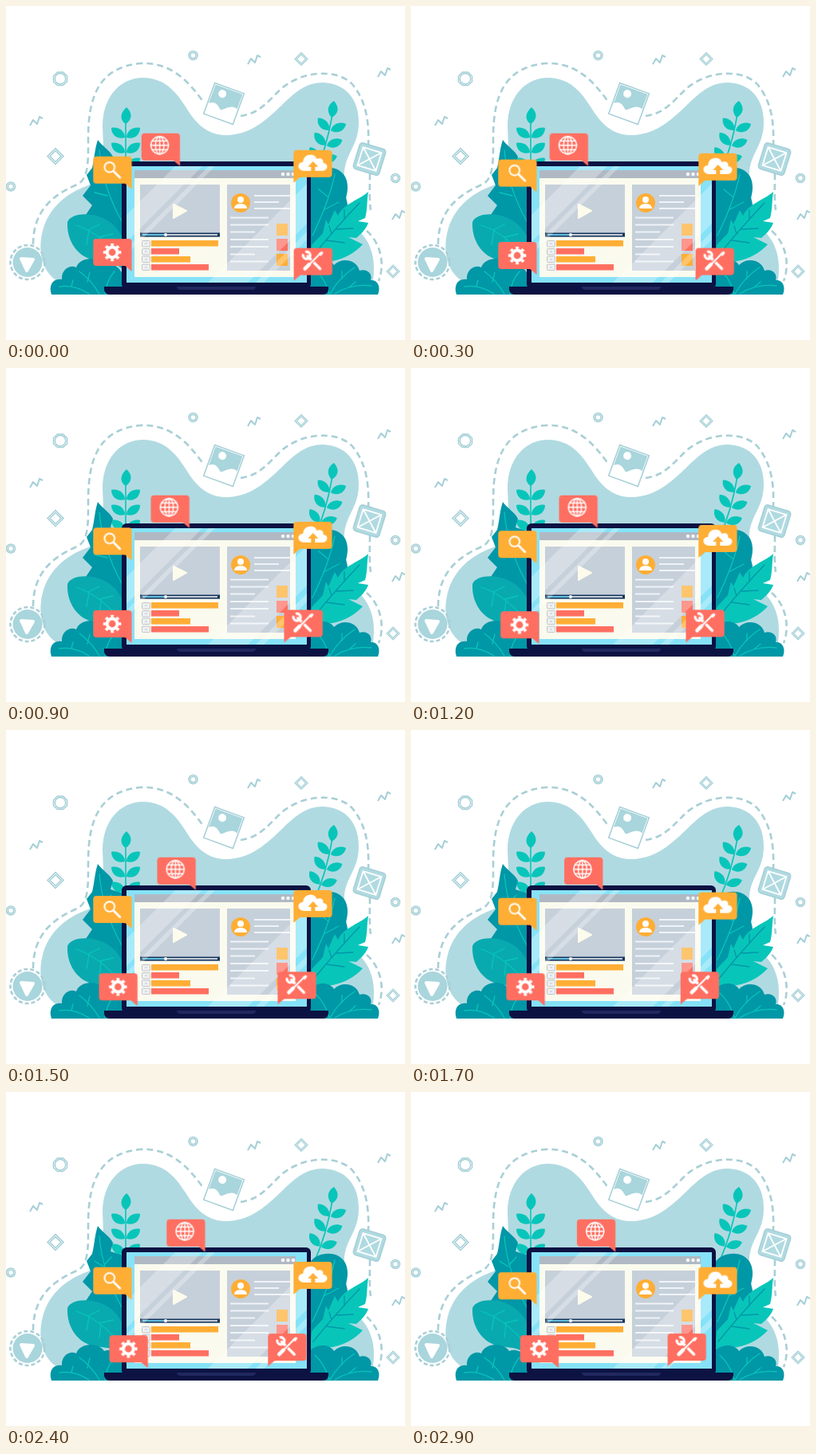
An HTML page for the animation above (3 s loop, 500 px wide and 419 px high).

```html
<!DOCTYPE html>
<html lang="en">
<head>
<meta charset="utf-8">
<title>Laptop with floating bubbles</title>
<style>
html, body { margin: 0; width: 500px; height: 419px; overflow: hidden; background: #fff; }
svg { display: block; }
.line { fill: none; stroke: #a5cfd7; stroke-width: 1.5; }
.dash { fill: none; stroke: #a9cfd6; stroke-width: 2.6; stroke-dasharray: 8 5; }
.vein { fill: none; stroke: #08c5ba; stroke-width: 1.3; stroke-linecap: round; }
.vein.dark { stroke: #0097a7; }
.ink { fill: none; stroke: #fff; stroke-linecap: round; }
.teal { fill: #08c5ba; }
.deep { fill: #0097a7; }
.red { fill: #ff6f61; }
.gold { fill: #ffae35; }
.move { animation: 3s steps(30) infinite; }
.globe { animation-name: globe; }
.search { animation-name: search; }
.cloud { animation-name: cloud; }
.gear { animation-name: gear; }
.tools { animation-name: tools; }
@keyframes globe { from { transform: translate(169.7px, 159.7px); } to { transform: translate(209.2px, 159.7px); } }
@keyframes search { from { transform: translate(109.3px, 188.7px); } to { transform: translate(109.3px, 227.5px); } }
@keyframes cloud { from { transform: translate(360.3px, 180.8px); } to { transform: translate(360.3px, 221px); } }
@keyframes gear {
  0% { transform: translate(109.3px, 292px); animation-timing-function: steps(10); }
  33.3333% { transform: translate(109.3px, 305.2px); animation-timing-function: steps(20); }
  100% { transform: translate(138.2px, 305.2px); }
}
@keyframes tools { from { transform: translate(360.6px, 303.6px); } to { transform: translate(320.2px, 303px); } }
</style>
</head>
<body>
<svg width="500" height="419" viewBox="0 0 500 419">
<defs>
  <path id="bubble" d="M4 0H44.3a4 4 0 0 1 4 4V41L40 34H4a4 4 0 0 1-4-4V4a4 4 0 0 1 4-4Z"/>
  <path id="leaf" d="M1 0C1-8 9-14 18-12C18-3 10 3 1 0Z"/>
  <g id="pair"><use href="#leaf"/><use href="#leaf" transform="scale(-1 1)"/></g>
  <path id="zig" class="line" d="M-8 5L-4-2L1 3L4-6L8-4" stroke-linejoin="round" style="stroke-width:2"/>
  <path id="diamond" class="line" d="M0-10L10 0L0 10L-10 0ZM0-7L7 0L0 7L-7 0Z"/>
  <clipPath id="screen"><path d="M151 201H377V347H151Z"/></clipPath>
</defs>

<!-- backdrop -->
<path fill="#b0dae1" d="M75 350C48 342 38 312 46 282C53 254 75 235 103 225C126 214 122 181 121 151C121 114 143 90 172 90C200 91 213 107 228 131C241 152 257 163 279 162C308 160 326 143 345 125C363 107 377 96 397 96C426 97 442 117 442 146C442 174 427 183 424 207C422 235 432 268 446 286C460 302 464 324 459 350Z"/>
<g class="dash">
  <path d="M34 299C34 262 53 239 89 224C104 217 103 194 103 166C103 108 120 77 168 72C205 70 227 92 247 120"/>
  <path d="M294 138C320 134 329 118 347 102C372 82 412 78 433 97C452 119 455 146 454 174"/>
  <path d="M456 210C456 228 455 242 457 256"/>
  <path d="M452 282C470 298 475 324 467 345"/>
</g>

<!-- scattered outline icons -->
<path class="line" d="M64.5 83H71.5L76.5 88V95L71.5 99.5H64.5L59.5 95V88Z"/>
<circle class="line" cx="68" cy="91.2" r="6.7"/>
<g class="line">
  <circle cx="234.5" cy="62" r="5.5"/><circle cx="234.5" cy="62" r="3.5"/>
  <circle cx="6" cy="226.5" r="5.5"/><circle cx="6" cy="226.5" r="3.5"/>
  <circle cx="488" cy="216" r="5.5"/><circle cx="488" cy="216" r="3.5"/>
</g>
<use href="#zig" x="38" y="145"/><use href="#zig" x="311" y="68"/>
<use href="#zig" x="474" y="84"/><use href="#zig" x="492" y="263"/>
<use href="#diamond" x="62" y="188.5"/>
<use href="#diamond" transform="translate(370 66.5) scale(.8)"/>
<use href="#diamond" transform="translate(485 333) scale(.8)"/>
<g transform="translate(273 122.5) rotate(20)">
  <rect class="line" x="-19.5" y="-20.5" width="39" height="41" style="fill:#fff"/>
  <path fill="#a9d5dc" d="M-18-19H18V1C10-3 5 5-1 9C-7 4-11 0-18 6Z"/>
  <circle cx="-6" cy="-11" r="5" fill="#fff"/>
</g>
<g transform="translate(455.5 192) rotate(17)">
  <rect class="line" x="-17" y="-17" width="34" height="34" rx="4" style="fill:#b0dae1"/>
  <path class="ink" stroke-width="1.8" d="M-12-12H12V12H-12ZL12 12M12-12L-12 12"/>
</g>
<circle class="dash" cx="27" cy="321.5" r="21.5" style="stroke-dasharray:5 3"/>
<circle cx="27" cy="321.5" r="18.5" fill="#a9d5dc"/>
<path fill="#fff" stroke="#fff" stroke-width="4" stroke-linejoin="round" d="M19 317L34 318L26 332Z"/>

<!-- plants -->
<g class="teal">
  <path d="M150 140V210M409 136Q402 178 386 214" fill="none" stroke="#08c5ba" stroke-width="1.6"/>
  <path d="M151 127C159 134 158 143 150 148C142 143 143 134 151 127Z"/>
  <use href="#pair" x="150" y="165"/><use href="#pair" x="150" y="184"/><use href="#pair" x="150" y="203"/>
  <path d="M411 119C418 127 417 135 408 140C401 132 403 124 411 119Z"/>
  <use href="#pair" transform="translate(406 156) rotate(12)"/>
  <use href="#pair" transform="translate(401 175) rotate(15)"/>
  <use href="#pair" transform="translate(394 194) rotate(18)"/>
</g>
<path class="deep" d="M115 168C122 177 130 181 134 189L131 200L147 205L160 300L117 285L100 262L108 250L96 238L106 225L101 212L108 203C111 191 111 180 115 168Z"/>
<path class="vein" d="M117 181Q121 227 145 270M122 219L111 212M127 238L111 234M123 217L132 207"/>
<path class="deep" d="M381 214C388 202 407 200 417 206C429 213 430 228 426 241C433 263 423 292 407 313L380 320Z"/>
<path class="vein" d="M412 211Q405 245 384 288M404 240L392 230M398 256L417 246"/>
<path fill="#08aab0" d="M77 271C82 260 103 259 119 265C138 272 150 290 152 315L148 332C133 316 116 323 102 316C86 309 76 291 77 271Z"/>
<path class="vein" d="M88 275Q121 286 148 322M103 281L117 274M117 290L134 286M104 282L101 299M119 292L117 308"/>
<path class="teal" d="M454 233C452 246 453 256 450 266L441 270L454 272C451 280 445 286 439 291L429 290L447 299C437 310 424 317 409 320L381 323L383 300L397 285L401 268L404 274L412 256L416 263C424 247 442 244 454 233Z"/>
<path class="vein dark" d="M443 247Q416 275 385 313M424 268V256M408 286L405 276M414 280L435 279M402 294L424 297"/>
<path class="deep" d="M57 362C53 350 59 341 70 343C69 331 80 324 88 328C93 314 116 314 123 325C135 320 147 331 147 343L158 362Z"/>
<path class="vein" d="M67 352Q85 349 104 361M92 333Q107 344 117 361M102 346L105 334M136 333Q126 344 124 361M82 352L84 344"/>
<path class="deep" d="M373 362V334C382 317 403 313 411 325C421 315 439 318 443 332C452 329 460 336 457 344C466 343 470 353 466 362Z"/>
<path class="vein" d="M387 330Q400 342 405 361M437 328Q418 340 406 361M458 351Q433 348 412 361M421 342V333M430 353L438 346"/>

<!-- laptop -->
<rect x="145" y="195" width="237" height="160" rx="6" fill="#0c1242"/>
<path fill="#86e2f8" d="M151 201H377V347H151Z"/>
<path fill="#fafaee" d="M161 206H363V340H161Z"/>
<path fill="#b0b9c3" d="M161 206H363V216H161Z"/>
<g fill="#f3f5f5"><circle cx="347" cy="211" r="2.3"/><circle cx="353.5" cy="211" r="2.3"/><circle cx="360" cy="211" r="2.3"/></g>
<path fill="#c6d0da" d="M168 224H268V290H168ZM277 224H356V332H277Z"/>
<path fill="#fcfbec" stroke="#fcfbec" stroke-width="2" stroke-linejoin="round" d="M210 249L226 257L210 266Z"/>
<path fill="#17365d" d="M168 284.5H268V289.5H168Z"/>
<path stroke="#fff" stroke-width="1.3" d="M171 287H265"/>
<path stroke="#44bde0" stroke-width="1.5" d="M171 287H200"/>
<circle cx="200" cy="287" r="2" fill="#fff"/>
<g fill="#eef0f1" stroke="#c0c6cc">
  <rect x="170.5" y="294.5" width="10" height="7.5" rx="1"/><rect x="170.5" y="304.5" width="10" height="7.5" rx="1"/>
  <rect x="170.5" y="314" width="10" height="7.5" rx="1"/><rect x="170.5" y="324" width="10" height="7.5" rx="1"/>
  <path fill="none" d="M174 298H177M174 308H177M174 318H177M174 328H177"/>
</g>
<path class="gold" d="M182 294H266V301.5H182ZM182 314H231V321.5H182Z"/>
<path class="red" d="M182 304H217V311.5H182ZM182 324H254V331.5H182Z"/>
<circle class="gold" cx="294" cy="247" r="12"/>
<circle cx="294" cy="243" r="4" fill="#fff"/>
<path fill="#fff" d="M286 254C286 246 302 246 302 254Z"/>
<path stroke="#f0f3f7" stroke-width="2" d="M311 238H356M311 246H342M311 254H356M281 265.5H329M281 274.5H329M281 283.5H312M281 293H329M281 302H329M281 311.5H312M281 320.5H329"/>
<path class="gold" d="M339 273H353V288H339ZM339 311H353V326H339Z"/>
<path class="red" d="M339 292H353V307H339Z"/>
<g clip-path="url(#screen)" fill="#fff" opacity=".28">
  <path d="M212 201H246L151 296V262ZM254 201H262L151 312V304ZM377 223V273L303 347H253ZM377 283V293L323 347H313Z"/>
</g>
<path fill="#0c1242" d="M123 352H404V356Q403 362 396 362H131Q124 362 123 356Z"/>
<path fill="#20285f" d="M214 352H313Q313 356 308 356H219Q214 356 214 352Z"/>

<!-- bubbles -->
<g class="move search">
  <use href="#bubble" class="gold"/>
  <circle class="ink" cx="20.5" cy="13.5" r="6.3" stroke-width="2"/>
  <path class="ink" stroke-width="2.8" d="M26 19L33.5 26.5"/>
</g>
<g class="move globe">
  <use href="#bubble" class="red"/>
  <g class="ink" stroke-width="1.4" transform="translate(22.8 15)">
    <circle r="11"/><ellipse rx="5.3" ry="11"/>
    <path d="M0-11V11M-11 0H11M-9.3-5.5H9.3M-9.3 5.5H9.3"/>
  </g>
</g>
<g class="move cloud">
  <use href="#bubble" class="gold" transform="matrix(-1 0 0 1 48.3 0)"/>
  <path fill="#fff" d="M14 26C4 26 4 15 12 15C12 4 27 3 29 11C35 9 38 12 37 16C45 17 43 26 36 26Z"/>
  <path class="gold" d="M24.5 14L31 21H27V27H22V21H18Z"/>
</g>
<g class="move gear">
  <use href="#bubble" class="red"/>
  <g fill="none" stroke="#fff" transform="translate(23.8 17)">
    <circle r="6.4" stroke-width="4"/>
    <circle r="9.5" stroke-width="3.4" pathLength="16" stroke-dasharray="1 1" stroke-dashoffset=".5"/>
  </g>
</g>
<g class="move tools">
  <use href="#bubble" class="red" transform="matrix(-1 0 0 1 48.3 0)"/>
  <g class="ink" transform="translate(23.5 16.5) scale(1.05)">
    <path stroke-width="3.2" d="M-6-6L9 9"/>
    <path stroke-width="3" stroke-linecap="butt" d="M-8.5-11A4.3 4.3 0 1 1-11-8.5"/>
    <path stroke="#ff6f61" stroke-width="4" d="M3-3L-3 3"/>
    <path stroke-width="2" d="M10-10L-3 3"/>
    <path stroke-width="4.5" d="M-4 4L-9 9"/>
    <path fill="#fff" stroke="none" d="M7-9L11-12L13-10L10-6Z"/>
  </g>
</g>
</svg>
</body>
</html>
```
